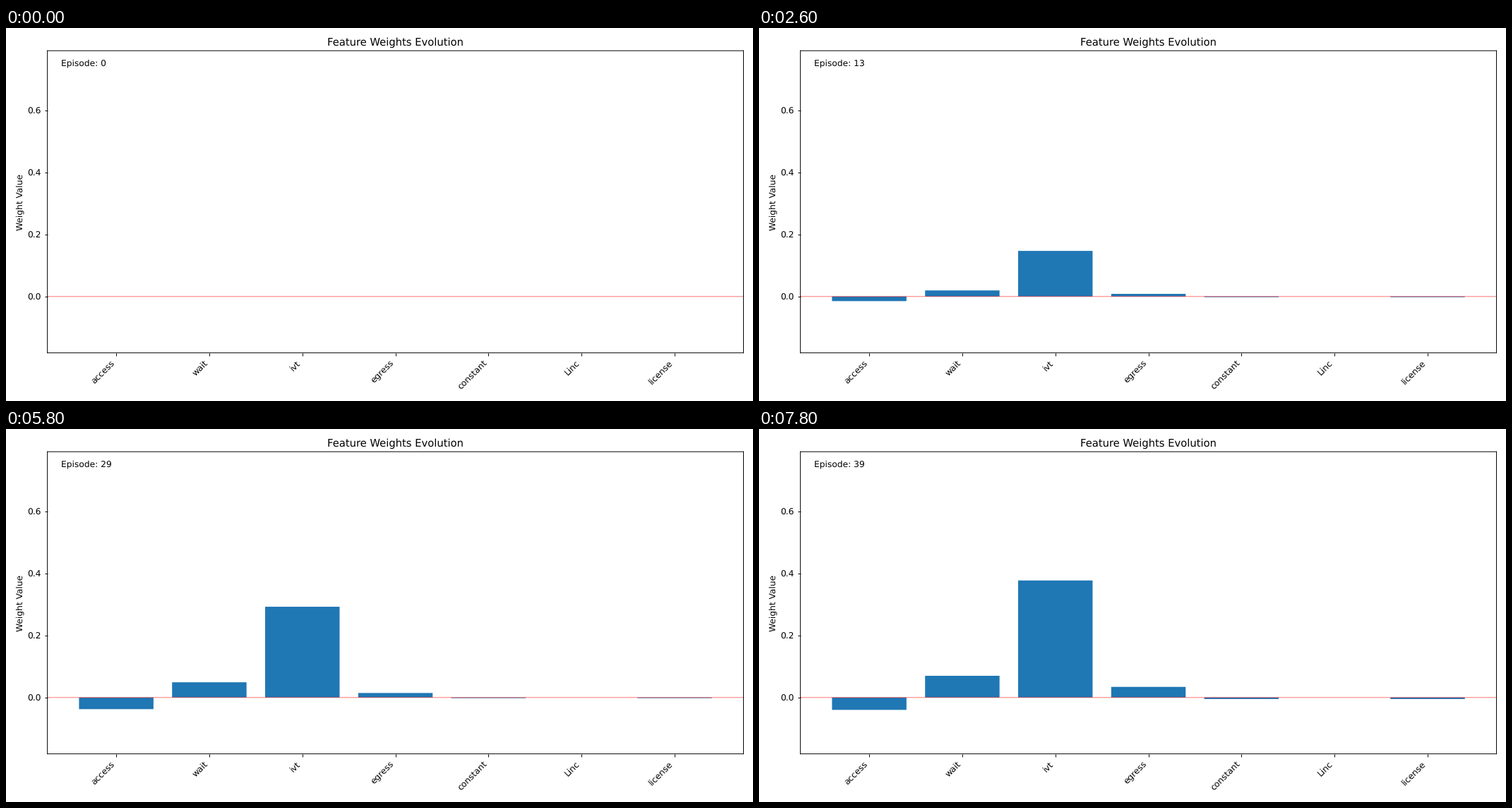
Animation of 1058 by 529 pixels, one loop 8000 ms. Source, as a matplotlib script:

```python
import numpy as np
import matplotlib.pyplot as plt
from matplotlib.animation import FuncAnimation

W, H = 1058, 529
EPISODES = 40
STEP_MS = 200
LEFT, RIGHT, TOP, BOTTOM = 58.6, 1044.5, 32.2, 460.7
NAMES = ["access", "wait", "ivt", "egress", "constant", "Linc", "license"]


def ease(t, start, end):
    x = np.clip((t - start) / (end - start), 0, 1)
    return x * x * (3 - 2 * x)


def settle(t, tau):
    """Jolt of the first update, dying away."""
    return np.exp(-(t - 1) / tau)


def weights(t):
    if t == 0:
        return [0] * len(NAMES)
    access = -0.008 - 0.032 * ease(t, 4, 34) - 0.03 * settle(t, 1)
    wait = 0.000863 * t ** 1.2 + 0.016 * settle(t, 4)
    ivt = 0.0163 * t ** 0.858
    egress = 0.0085 + 0.026 * ease(t, 24, 40)
    bias = -0.002 - 0.003 * ease(t, 33, 39) - 0.002 * settle(t, 4)
    return [access, wait, ivt, egress, bias, 0, bias]


plt.rcParams.update({"font.family": "DejaVu Sans", "text.hinting": "none"})
fig = plt.figure(figsize=(12, 6), dpi=88.1667, facecolor="white")
ax = fig.add_axes([LEFT / W, 1 - BOTTOM / H, (RIGHT - LEFT) / W, (BOTTOM - TOP) / H])

slots = range(len(NAMES))
bars = ax.bar(slots, weights(0), color="#1f77b4")
zero = ax.axhline(0, color="red", alpha=0.5, linewidth=0.9)
ax.set_xlim(-0.74, 6.74)
ax.set_ylim(-0.182, 0.7937)
ax.set_yticks(np.arange(4) * 0.2)
ax.set_xticks(slots, NAMES, rotation=45, ha="right")
ax.set_ylabel("Weight Value")
ax.set_title("Feature Weights Evolution")
label = ax.text(0.02, 0.95, "", transform=ax.transAxes)

# Keep edges at their fractional pixel positions
for artist in [*bars, zero, *ax.spines.values()]:
    artist.set_snap(False)


def update(episode):
    for bar, value in zip(bars, weights(episode)):
        bar.set_height(value)
    label.set_text(f"Episode: {episode}")
    return [*bars, label]


anim = FuncAnimation(fig, update, frames=EPISODES, interval=STEP_MS,
                     repeat=True, repeat_delay=0, blit=False)
plt.show()
```
